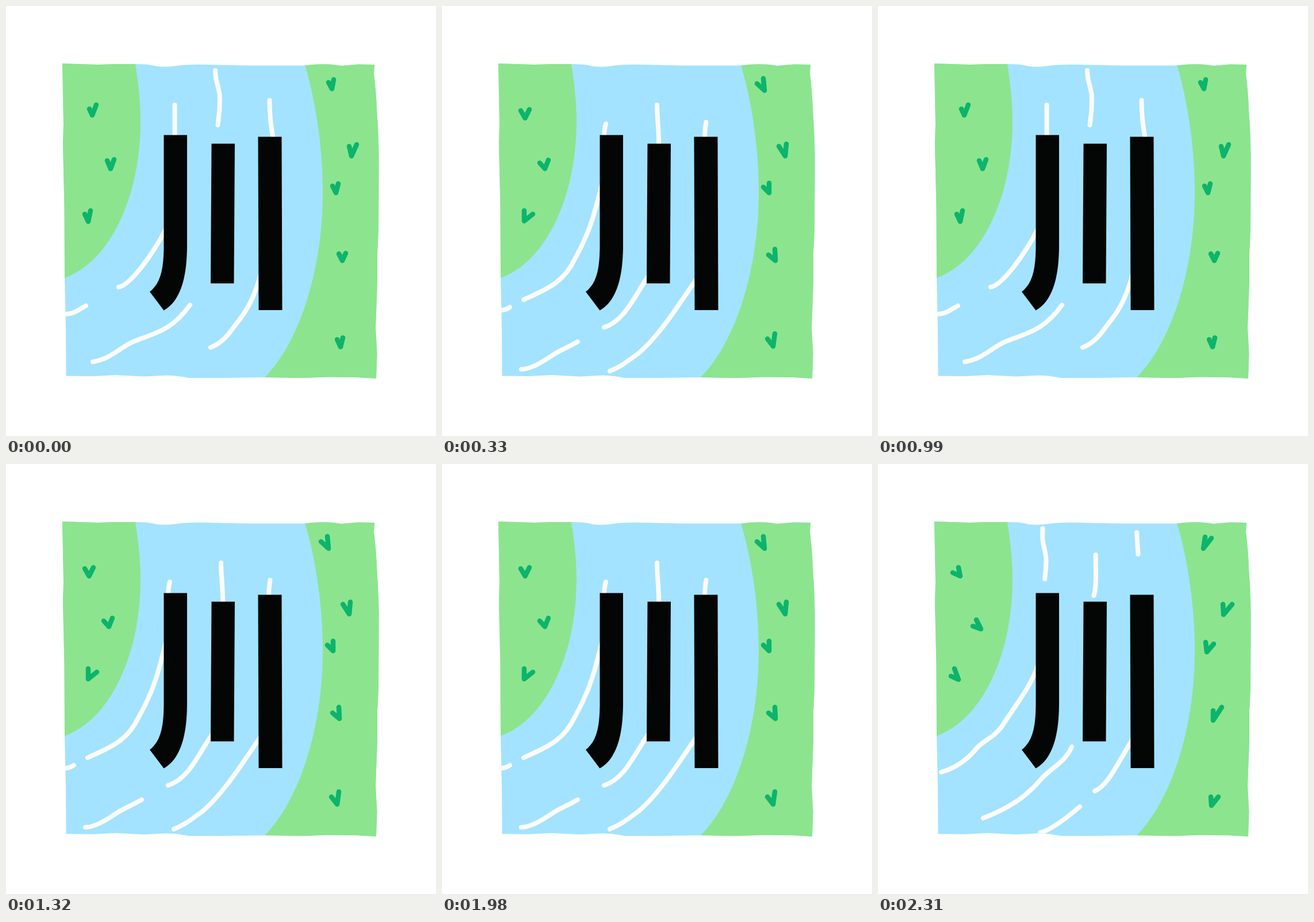
These frames come from a looping animation (748x748 px, 3.96 s). An HTML page:

```html
<!DOCTYPE html>
<html lang="ja">
<head>
<meta charset="utf-8">
<title>川</title>
<style>
  html, body { margin: 0; height: 100%; overflow: hidden; background: #fff; }
  svg { display: block; width: 100%; height: 100%; }

  .pose { fill: none; stroke-width: 8; stroke-linecap: round; stroke-linejoin: round;
          visibility: hidden; animation: 3.96s step-end infinite; }
  .water { stroke: #fdfcf7; }
  .grass { stroke: #0cb46c; stroke-width: 8.5; }
  .one { animation-name: one; }
  .two { animation-name: two; }
  .three { animation-name: three; }

  /* Pose order in twelfths: 1 2 3 1 2 1 2, then 3 held to the end. */
  @keyframes one {
    0%, 25%, 41.6666% { visibility: visible; }
    8.3333%, 33.3333%, 50%, 100% { visibility: hidden; }
  }
  @keyframes two {
    8.3333%, 33.3333%, 50% { visibility: visible; }
    0%, 16.6666%, 41.6666%, 58.3333%, 100% { visibility: hidden; }
  }
  @keyframes three {
    16.6666%, 58.3333%, 100% { visibility: visible; }
    0%, 25% { visibility: hidden; }
  }
</style>
</head>
<body>
<svg viewBox="0 0 748 748">
  <clipPath id="paper">
    <path d="M98 100 L160 102 L190 101 L225 101 Q250 101 262 105 Q282 107 297 104 Q320 101 350 102 L415 103.500 L520 103.500 Q545 100 570 102 L583 104 L612 101.500 L641 102
             L640 118 Q644 150 645 180 Q649 235 648.500 280 L648 390 L646 430 L646 480 L643 560 L645.500 605 L644 648
             L610 646 L560 645.500 L515 647 L450 646 L375 647 L318 647 Q300 643 280 642.500 L240 644.500 L190 642 L150 644 L104.500 643.500
             L104 560 L102 470 L101.500 350 L99 240 L100 205 Z"/>
  </clipPath>

  <g clip-path="url(#paper)">
    <path fill="#a3e3ff" d="M90 90H660V660H90Z"/>
    <g fill="#8de48e">
      <path d="M90 90H223L225 101C231 140 234 170 234 200C234 330 182 444 102 473L90 477Z"/>
      <path d="M660 90H516L520 103C540 170 551 250 551 325C551 460 510 585 450 646L436 660H660Z"/>
    </g>

    <g class="pose one">
      <path class="water" d="M293.500 172V230 M364 112C364 135 372 140 372 162C372 185 370 195 368.500 207
        M458.500 164C458 190 461 210 465 232 M278 388C262 420 220 484 196 489
        M104 536C118 536 128 527 139 521.500 M320 520C285 570 250 570 215 587C190 601 180 614 151 619
        M442 470C425 530 405 545 390 567C378 582 370 588 356 594"/>
      <path class="grass" d="M145 179L150 190L157 172 M176 269L182 283L188 267 M137 362L143 375L147 356
        M561 133L567 144L570 128 M597 244L601 261L610 241 M568 313L574 325L578 309
        M579 431L585 443L591 430 M576 580L582 593L586 577"/>
    </g>

    <g class="pose two">
      <path class="water" d="M285 205C283 212 282 220 282 230 M374 172C374 195 378 220 377 245
        M459.500 202C458 210 457 220 457 232 M278 310C265 365 254 400 231 440C210 485 175 495 142 511
        M104 529C112 529 114 526 118 524 M236 584C215 596 200 601 190 609C170 622 155 631 138 632
        M360 468C335 504 318 548 282 559 M442 476C415 514 380 572 342 604C320 620 310 628 292 635"/>
      <path class="grass" d="M137 182L144.500 195L152 180 M170 273L179 283L185 268 M143 356L143 374L158 362
        M548 135L561 147L559 126 M586 244L597 261L599 240 M559 315L569 325L569 308
        M568 433L580 443L579 423 M566 579L576 592L579 570"/>
    </g>

    <g class="pose three">
      <path class="water" d="M286.500 112C284 145 293 148 292.500 170C292 185 291 192 290 200
        M378.500 158C379 190 380 215 375.500 229 M450 119L452.500 157
        M278 350C265 390 238 420 216 456C200 477 185 480 172 494C155 515 135 529 110 536
        M337 492C325 520 300 529 283 549C257 580 225 600 183 616
        M442 480C415 524 400 559 377 569 M351 596C330 614 300 638 282 641"/>
      <path class="grass" d="M130 189L143 195L140 180 M165 282L179 287L171 271 M127 369L140 375L133 356
        M569 127L566 147L580 129 M600 244L601 262L616 244 M570 310L572 327L584 313
        M583 429L583 446L598 423 M579 579L580 594L592 579"/>
    </g>
  </g>

  <g fill="#030605">
    <path d="M274.500 224.500H315V415C315 470 305 512 274.500 529.500L250 497C270 482 274 455 274.500 420Z"/>
    <path d="M357.500 239.500H398L396.500 482.500H356Z"/>
    <path d="M438.500 227.500H479.500L480.500 529H439.500Z"/>
  </g>
</svg>
</body>
</html>
```
